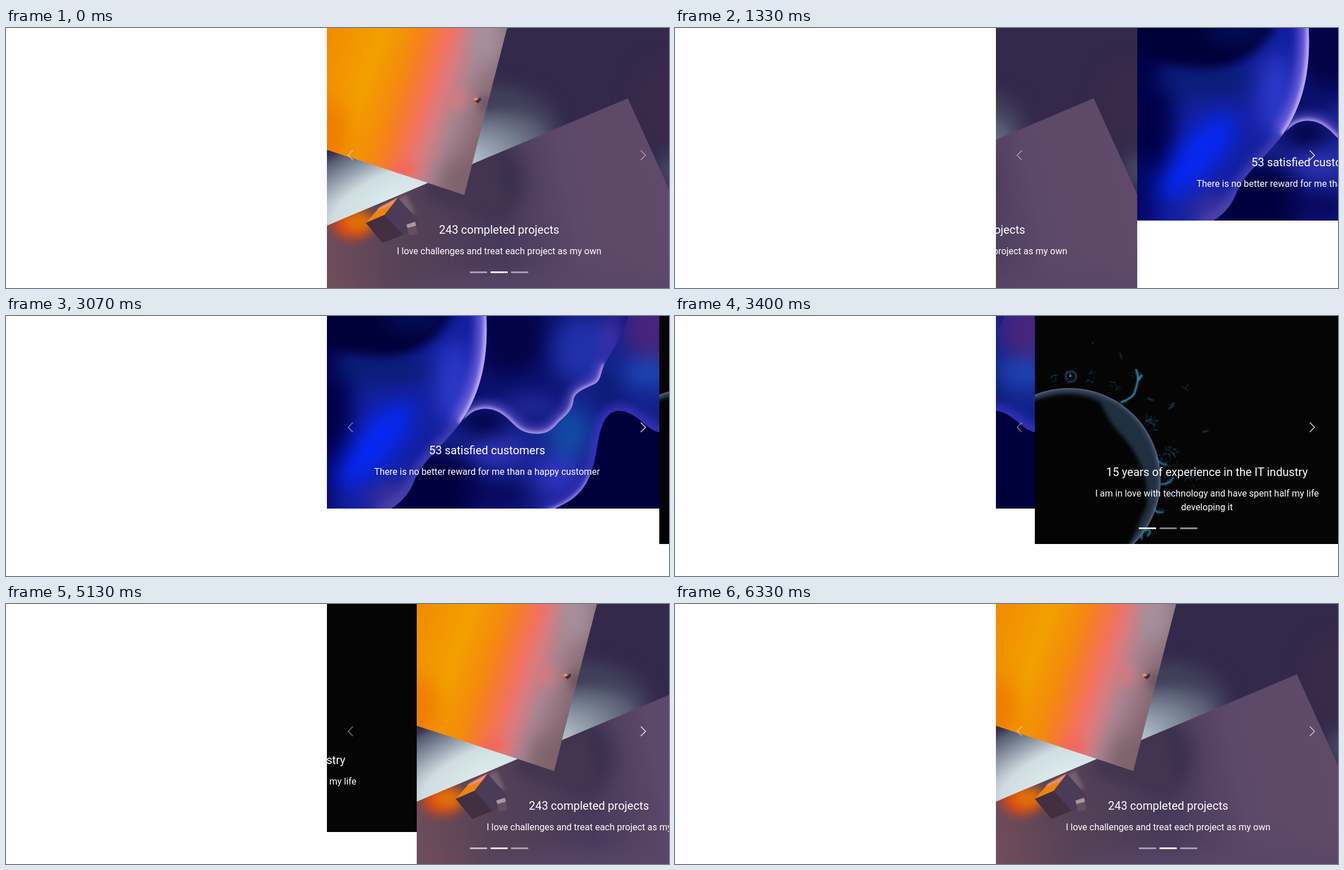
An HTML page that plays this animation: 1159 by 455 pixels, repeating every 6390 ms.

```html
<!DOCTYPE html>
<html lang="en">
<head>
<meta charset="utf-8">
<title>Carousel</title>
<style>
  html, body { margin: 0; width: 100%; height: 100%; overflow: hidden; background: #fff; }
  svg { display: block; }
  text { font: 16px Roboto, sans-serif; fill: #fff; text-anchor: middle; }
  .title { font-size: 20px; }
  .b1 { filter: blur(1px); }
  .b3 { filter: blur(3px); }
  .b9 { filter: blur(9px); }
  .b18 { filter: blur(18px); }
  .glow { fill: none; }
  .line { fill: none; stroke: #fff; stroke-width: 1.4; stroke-linecap: round; stroke-linejoin: round; }
</style>
</head>
<body>
<svg width="1159" height="455" viewBox="0 0 1159 455">
  <defs>
    <linearGradient id="paper" gradientUnits="userSpaceOnUse" x1="561" y1="0" x2="863" y2="105">
      <stop offset="0" stop-color="#f28a00"/>
      <stop offset=".3" stop-color="#f2a000"/>
      <stop offset=".46" stop-color="#f58a0c"/>
      <stop offset=".56" stop-color="#f57a35"/>
      <stop offset=".64" stop-color="#f2715f"/>
      <stop offset=".72" stop-color="#d97c80"/>
      <stop offset=".82" stop-color="#a88490"/>
      <stop offset="1" stop-color="#80656f"/>
    </linearGradient>
    <radialGradient id="light" gradientUnits="userSpaceOnUse" cx="0" cy="0" r="1"
      gradientTransform="translate(680 296) rotate(-23) scale(340 128)">
      <stop offset="0" stop-color="#dcecee"/>
      <stop offset=".34" stop-color="#cfdde1"/>
      <stop offset=".58" stop-color="#8e9aa8"/>
      <stop offset=".82" stop-color="#555970"/>
      <stop offset="1" stop-color="#34294a" stop-opacity="0"/>
    </radialGradient>
    <linearGradient id="floor" gradientUnits="userSpaceOnUse" x1="561" y1="420" x2="1159" y2="300">
      <stop offset="0" stop-color="#6f4d5b"/>
      <stop offset=".22" stop-color="#564256"/>
      <stop offset=".5" stop-color="#47395a"/>
      <stop offset=".72" stop-color="#5c4868"/>
      <stop offset="1" stop-color="#604a69"/>
    </linearGradient>
    <path id="paperShape" d="M561 0H876L801 292L561 213Z"/>
    <path id="floorShape" d="M561 346L1087 123L1163 291V455H561Z"/>
    <path id="waveA" d="M540-10H860C866 70 852 135 815 187C785 228 752 250 736 285C728 307 715 325 690 340H540Z"/>
    <path id="waveB" d="M850-10H1112C1100 35 1078 65 1067 85C1060 100 1062 112 1050 119C1030 128 1014 134 1013 148C1011 168 995 177 985 188C972 204 960 207 945 206C915 205 908 185 890 173C870 158 842 158 825 178L800 200Z"/>
    <path id="waveC" d="M850-10H1180V204C1160 206 1150 200 1135 187C1118 172 1104 165 1090 166C1068 168 1060 195 1055 225C1050 262 1040 290 1025 307C1008 326 990 332 970 342H700V200Z"/>
    <path id="rimA" d="M860-40C866 70 852 135 815 187"/>
    <path id="rimB" d="M1067 85C1060 100 1062 112 1050 119C1030 128 1014 134 1013 148C1011 168 995 177 985 188C972 204 960 207 945 206C915 205 908 185 890 173C870 158 842 158 825 178"/>
    <path id="rimC" d="M1200 206C1160 206 1150 200 1135 187C1118 172 1104 165 1090 166C1068 168 1060 195 1055 225C1050 262 1040 290 1025 307C1008 326 990 332 960 345"/>
    <circle id="planet" cx="621" cy="286" r="160"/>
    <clipPath id="inPaper"><use href="#paperShape"/></clipPath>
    <clipPath id="inFloor"><use href="#floorShape"/></clipPath>
    <clipPath id="inA"><use href="#waveA"/></clipPath>
    <clipPath id="inB"><use href="#waveB"/></clipPath>
    <clipPath id="inC"><use href="#waveC"/></clipPath>
    <clipPath id="inPlanet"><use href="#planet"/></clipPath>
  </defs>

  <svg x="561" width="598" height="455" viewBox="561 0 598 455">
    <!-- paper sheets -->
    <g class="slide"><svg x="561" width="602" height="455" viewBox="561 0 602 455">
      <rect x="561" width="602" height="455" fill="#33294a"/>
      <g class="b18">
        <ellipse cx="1150" cy="130" rx="50" ry="70" fill="#3a2a49"/>
        <ellipse cx="1165" cy="250" rx="16" ry="26" fill="#5c667a"/>
        <ellipse cx="885" cy="140" rx="75" ry="28" fill="#474a62" transform="rotate(15 885 140)"/>
      </g>
      <rect x="561" width="602" height="455" fill="url(#light)"/>
      <use href="#floorShape" fill="url(#floor)"/>
      <g clip-path="url(#inFloor)">
        <g class="b18">
          <ellipse cx="855" cy="265" rx="52" ry="62" fill="#3a2f4d"/>
          <ellipse cx="950" cy="455" rx="260" ry="25" fill="#574666"/>
        </g>
        <g class="b9">
          <path d="M735 255L860 220L880 330Q800 320 735 300Z" fill="#433550"/>
          <ellipse cx="606" cy="342" rx="36" ry="28" fill="#d84418"/>
          <ellipse cx="617" cy="340" rx="29" ry="17" fill="#e07008"/>
        </g>
      </g>
      <use href="#paperShape" fill="url(#paper)"/>
      <g clip-path="url(#inPaper)">
        <g class="b18">
          <ellipse cx="560" cy="185" rx="40" ry="60" fill="#f07c00"/>
          <ellipse cx="840" cy="20" rx="25" ry="50" fill="#a4929d"/>
          <ellipse cx="795" cy="275" rx="35" ry="45" fill="#7d626c"/>
        </g>
        <g class="b9">
          <ellipse cx="790" cy="125" rx="15" ry="22" fill="#e5757a" opacity=".6"/>
          <ellipse cx="695" cy="248" rx="25" ry="10" fill="#f26558"/>
          <ellipse cx="838" cy="134" rx="8" ry="16" fill="#5c4650"/>
        </g>
      </g>
      <path d="M816 124L822 121L826 126L823 132Z" fill="#f0895a"/>
      <path d="M819 128L824 126L829 121L831 126L825 132Z" fill="#3c2c45"/>
      <path class="b3" d="M652 316L700 291L716 325L690 320Z" fill="#967e88" opacity=".5"/>
      <path d="M629 341L652 315L685 297L662 327Z" fill="#ee8310"/>
      <path class="b1" d="M652 315L685 297L676 309L648 320Z" fill="#ef8e73"/>
      <path d="M629 341L662 327L694 362L658 376Z" fill="#422f40"/>
      <path d="M662 327L685 297L718 334L719 350L694 362Z" fill="#4a3b58"/>
      <path d="M701 349L717 346L719 360L705 363Z" fill="#62505f"/>
      <path d="M700 344L715 339L717 346L702 350Z" fill="#ab9798"/>
      <text class="title" x="862" y="360">243 completed projects</text>
      <text x="862" y="396">I love challenges and treat each project as my own</text>
    </svg></g>

    <!-- blue waves -->
    <g class="slide"><svg x="561" width="602" height="337" viewBox="561 0 602 337">
      <rect x="561" width="602" height="337" fill="#00003b"/>
      <g clip-path="url(#inC)">
        <rect x="561" width="602" height="337" fill="#15228c"/>
        <g class="b18">
          <ellipse cx="770" cy="310" rx="85" ry="75" fill="#00003f"/>
          <ellipse cx="855" cy="185" rx="42" ry="25" fill="#000040"/>
          <ellipse cx="880" cy="237" rx="50" ry="22" fill="#3335bd"/>
          <ellipse cx="880" cy="315" rx="60" ry="30" fill="#08085c"/>
          <ellipse cx="1005" cy="205" rx="38" ry="48" fill="#124ba5"/>
          <ellipse cx="985" cy="280" rx="40" ry="32" fill="#3232c0"/>
          <ellipse cx="1075" cy="130" rx="28" ry="40" fill="#0e1a76"/>
          <ellipse cx="1150" cy="20" rx="50" ry="55" fill="#48257c"/>
          <ellipse cx="1145" cy="100" rx="50" ry="24" fill="#1c48b8"/>
        </g>
        <use class="glow b9" href="#rimC" stroke="#473ad0" stroke-width="14"/>
        <path class="glow b3" d="M1045 275C1035 300 1020 325 960 345" stroke="#a294ec" stroke-width="7"/>
      </g>
      <g clip-path="url(#inB)">
        <rect x="800" width="320" height="230" fill="#0a116e"/>
        <g class="b18">
          <ellipse cx="900" cy="30" rx="62" ry="75" fill="#040347"/>
          <ellipse cx="1030" cy="60" rx="55" ry="65" fill="#2030a8"/>
          <ellipse cx="940" cy="160" rx="60" ry="22" fill="#222a9e"/>
          <ellipse cx="1085" cy="40" rx="14" ry="60" fill="#5034b0"/>
        </g>
        <use class="glow b9" href="#rimB" stroke="#6656d4" stroke-width="20"/>
        <use class="glow b3" href="#rimB" stroke="#c0b0ee" stroke-width="6"/>
      </g>
      <g clip-path="url(#inA)">
        <rect x="561" width="310" height="337" fill="#1420a0"/>
        <g class="b18">
          <ellipse cx="565" cy="150" rx="62" ry="140" fill="#000048"/>
          <ellipse cx="555" cy="300" rx="45" ry="80" fill="#04086a"/>
          <ellipse cx="680" cy="92" rx="90" ry="30" fill="#0a1e76"/>
          <ellipse cx="665" cy="225" rx="95" ry="34" fill="#0628f4" transform="rotate(-48 665 225)"/>
          <ellipse cx="805" cy="120" rx="32" ry="75" fill="#2c38c8"/>
          <ellipse cx="700" cy="325" rx="45" ry="30" fill="#40359a"/>
        </g>
        <path class="b9" d="M500-60H820C795 45 740 70 680 71S590 55 500 38Z" fill="#000039"/>
        <ellipse class="b18" cx="735" cy="5" rx="55" ry="18" fill="#04125e"/>
        <path class="glow b9" d="M815 187C785 228 752 250 736 285C728 307 715 325 670 350" stroke="#5548b4" stroke-width="16"/>
        <use class="glow b9" href="#rimA" stroke="#7364de" stroke-width="34"/>
        <use class="glow b3" href="#rimA" stroke="#c3b2f1" stroke-width="9"/>
      </g>
      <text class="title" x="862" y="242">53 satisfied customers</text>
      <text x="862" y="278">There is no better reward for me than a happy customer</text>
    </svg></g>

    <!-- dark planet -->
    <g class="slide"><svg x="561" width="602" height="399" viewBox="561 0 602 399">
      <rect x="561" width="602" height="399" fill="#050506"/>
      <g clip-path="url(#inPlanet)">
        <use href="#planet" fill="#213040"/>
        <path class="b3" d="M520 165Q610 118 675 150Q692 190 718 214Q762 270 757 330L715 430H520Z" fill="#040405"/>
        <use class="glow b3" href="#planet" stroke="#405269" stroke-width="9"/>
        <use class="glow b1" href="#planet" stroke="#5c617a" stroke-width="3"/>
      </g>
      <g id="wisps" class="line" style="stroke:#2b7499;stroke-width:1">
        <g class="b1" stroke-width="3">
          <path d="M712 151Q733 143 736 133T741 113Q742 102 738 94M741 113L748 104" stroke="#3a91b8"/>
          <path d="M616 112Q612 97 623 97T633 106Q633 117 618 115" stroke="#285a78" stroke-width="2"/>
          <path d="M774 248Q779 260 791 261M781 294Q796 296 803 283M770 337Q773 346 785 343M748 390Q746 376 757 375T758 385"/>
          <path d="M758 144L768 148M796 163L804 152M855 203L864 201M710 66L713 74" stroke-width="2" opacity=".6"/>
        </g>
        <circle cx="623" cy="105" r="1.5" fill="#70b8d0"/>
        <circle cx="662" cy="47" r=".6"/>
      </g>
      <text class="title" x="862" y="280">15 years of experience in the IT industry</text>
      <text x="862" y="316">I am in love with technology and have spent half my life</text>
      <text x="862" y="340">developing it</text>
    </svg></g>

    <g id="dots" fill="#fff">
      <rect x="811" width="30" height="3"/>
      <rect x="847" width="30" height="3"/>
      <rect x="883" width="30" height="3"/>
    </g>
    <g id="arrows" class="line">
      <path d="M606-8L598 0L606 8" opacity=".5"/>
      <path id="next" d="M1110-8L1118 0L1110 8"/>
    </g>
  </svg>
</svg>
<script>
const LOOP = 6390, WIDTH = 602, SLIDE_TIME = 600, FADE_TIME = 150;
const heights = [455, 337, 399];
const moves = [
  { at: 4865 - LOOP, from: 2, to: 0 },
  { at: 1126, from: 0, to: 1 },
  { at: 3040, from: 1, to: 2 },
  { at: 4865, from: 2, to: 0 }
];
const byId = id => document.getElementById(id);
const slides = document.querySelectorAll('.slide');
const dots = [...byId('dots').children];
const dotOf = slide => (slide + 1) % 3;

// The CSS "ease" curve, cubic-bezier(.25, .1, .25, 1).
function ease(x) {
  if (x <= 0) return 0;
  if (x >= 1) return 1;
  const curve = (a, b, s) => 3 * (1 - s) * s * (a * (1 - s) + b * s) + s ** 3;
  let low = 0, high = 1;
  for (let i = 0; i < 24; i++) {
    const mid = (low + high) / 2;
    if (curve(.25, .25, mid) < x) low = mid; else high = mid;
  }
  return curve(.1, 1, low);
}

function addWisps() {
  let seed = 7;
  const random = () => (seed = seed * 16807 % 2147483647) / 2147483647;
  // x, y, spread, count
  const clusters = [
    [660, 104, 15, 12], [623, 106, 9, 8], [592, 107, 7, 6], [702, 123, 8, 8], [740, 103, 9, 12],
    [765, 188, 15, 30], [798, 238, 20, 30], [788, 258, 7, 8], [794, 287, 10, 12], [835, 283, 17, 12],
    [779, 340, 6, 8], [757, 380, 6, 8], [801, 158, 7, 5], [715, 150, 8, 7], [825, 130, 14, 4]
  ];
  let markup = '<g style="filter:blur(.6px)">';
  for (const [x, y, spread, count] of clusters)
    for (let i = 0; i < count; i++) {
      const r = scale => ((random() + random() - 1) * scale).toFixed(1);
      markup += `<path d="M${x + +r(spread)} ${y + +r(spread)}q${r(7)} ${r(7)} ${r(9)} ${r(9)}" opacity="${(.15 + random() * .5).toFixed(2)}"/>`;
    }
  byId('wisps').insertAdjacentHTML('beforeend', markup + '</g>');
}

function draw(now) {
  const t = now % LOOP;
  const { at, from, to } = moves.findLast(move => move.at <= t);
  const p = ease((t - at) / SLIDE_TIME);
  const height = p < 1 ? Math.max(heights[from], heights[to]) : heights[to];
  const shift = Math.round(WIDTH * p);

  slides.forEach((slide, i) => {
    slide.setAttribute('transform', `translate(${i === to ? WIDTH - shift : -shift})`);
    slide.style.display = i === to || (i === from && p < 1) ? '' : 'none';
  });
  dots.forEach((dot, i) => {
    dot.setAttribute('y', height - 29);
    dot.setAttribute('opacity', i === dotOf(to) ? .5 + p / 2 : i === dotOf(from) ? 1 - p / 2 : .5);
  });
  const hover = ease((t - 370) / FADE_TIME) - ease((t - 6290) / FADE_TIME);
  byId('next').setAttribute('opacity', .5 + .4 * hover);
  byId('arrows').setAttribute('transform', `translate(0 ${height / 2 - 4.8})`);
}

addWisps();
const start = performance.now();
(function tick() {
  draw(performance.now() - start);
  requestAnimationFrame(tick);
})();
</script>
</body>
</html>
```
